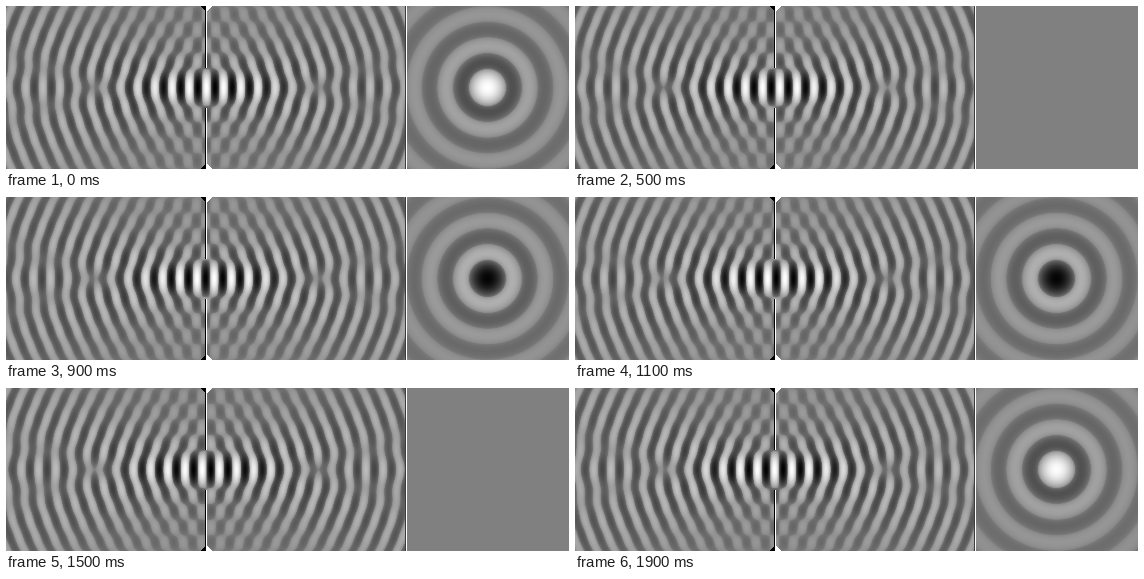
A matplotlib script for the animation above (2 s loop, 563 px wide and 163 px high).

```python
import numpy as np
import matplotlib.pyplot as plt
from matplotlib.animation import FuncAnimation

W, H, DPI = 563, 163, 100
FRAMES, STEP = 20, 100
FOCUS_X, MID_Y = 200, 81
SLICE_X, SLICE_Y = 481, 81
WAVELENGTH = 16.0
HALF_ANGLE = np.radians(31)
GAMMA, GAIN = 0.5, 1.0


def bessel_j0(x):
    phi = (np.arange(48) + 0.5) * np.pi / 48
    return np.mean(np.cos(np.asarray(x)[..., None] * np.cos(phi)), axis=-1)


# Focused wave as a sum of plane waves filling a cone
k = 2 * np.pi / WAVELENGTH
n = 120
theta = (np.arange(n) + 0.5) * HALF_ANGLE / n
weight = np.sin(theta) / np.sin(theta).sum()


def radial(r):
    return bessel_j0(k * np.outer(r, np.sin(theta))) * weight


z = np.arange(400) - FOCUS_X
beam = radial(np.abs(np.arange(H) - MID_Y)) @ np.exp(1j * k * np.outer(np.cos(theta), z))

yy, xx = np.mgrid[:H, 401:W]
dist = np.hypot(xx - SLICE_X, yy - SLICE_Y)
radii = np.arange(0, 130, 0.5)
spot = np.interp(dist, radii, radial(radii).sum(axis=1))


def shade(v):
    return 128 + 127 * GAIN * np.sign(v) * np.abs(v) ** GAMMA


def picture(i):
    turn = np.exp(-2j * np.pi * i / FRAMES)
    img = np.full((H, W), 255.0)
    img[:, :400] = shade((beam * turn).real)
    img[:, 401:] = shade(spot * np.round(turn.real, 9))
    for rows in (slice(0, 62), slice(102, H)):
        img[rows, 199] = 0
        img[rows, 200] = 255
    img[:, 399] = 60
    for d in range(5):
        for row in (d, H - 1 - d):
            img[row, 195 + d:200] = 0
            img[row, 200:206 - d] = 255
    return np.clip(img, 0, 255)


fig = plt.figure(figsize=(W / DPI, H / DPI), dpi=DPI)
ax = fig.add_axes([0, 0, 1, 1])
ax.axis("off")
view = ax.imshow(picture(0), cmap="gray", vmin=0, vmax=255,
                 interpolation="nearest", aspect="auto")


def update(i):
    view.set_data(picture(i))
    return [view]


anim = FuncAnimation(fig, update, frames=FRAMES, interval=STEP, repeat=True, blit=False)
plt.show()
```
